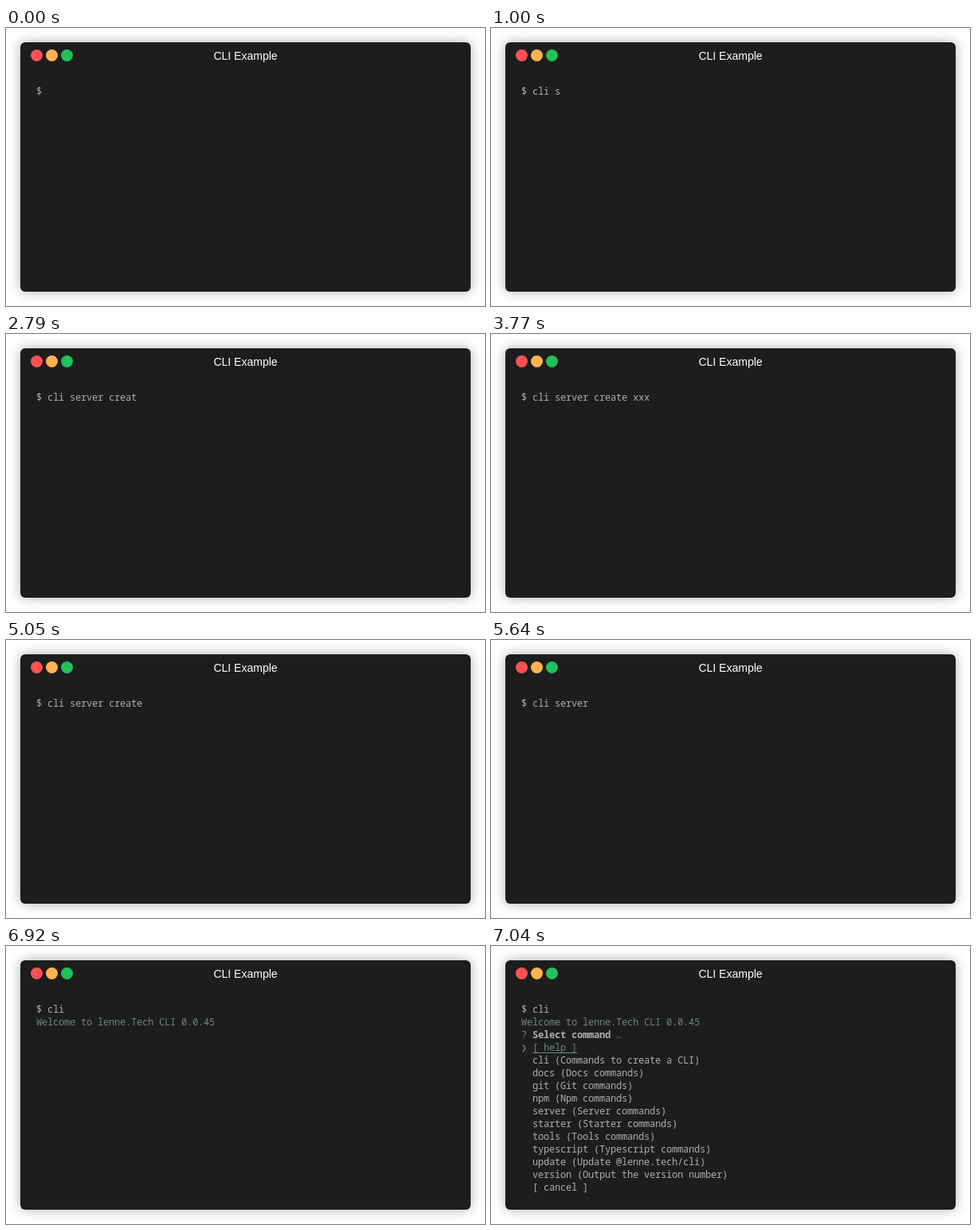
Write an HTML page with a canvas that moves like this. It is 601 by 350 pixels and loops after 8000 ms.

```html
<!DOCTYPE html>
<html lang="en">
<head>
<meta charset="utf-8">
<title>CLI Example</title>
<style>
  html, body { margin: 0; width: 100%; height: 100%; overflow: hidden; background: #fff; }
  .window {
    position: absolute; left: 18px; top: 18px; width: 565px; height: 314px;
    border-radius: 6px; background: #1d1d1d; box-shadow: 0 0 15px rgba(0, 0, 0, .32);
  }
  canvas { position: absolute; left: 0; top: 0; }
</style>
</head>
<body>
<div class="window"></div>
<canvas id="stage" width="601" height="350"></canvas>
<script>
const ctx = document.getElementById('stage').getContext('2d');

const LOOP = 8000;
const CELL = 7, ROW = 16, LEFT = 38, BASELINE = 84;
const MONO = '12px "Noto Sans Mono", "DejaVu Sans Mono", monospace';
const FG = '#afafaf', CYAN = '#708387', GRAY = '#626566';

const COMMAND = 'cli server create xxx';
const WELCOME_AT = 6920, MENU_AT = 7040;

// Moments at which the visible part of the command reaches a given length.
const keys = [];
const type = (from, ...times) => times.forEach((t, i) => keys.push([t, from + i]));
const erase = (from, ...times) => times.forEach((t, i) => keys.push([t, from - i]));
const evenly = (start, end, n) =>
  Array.from({ length: n }, (_, i) => start + (end - start) * i / (n - 1));

type(1, 200, 400, 600, 800);
type(5, 1000, 1180, 1280, 1480, 1680, 1750, 1950);
type(12, 2110, 2310, 2450, 2650, 2790, 2970, 3170);
type(19, 3370, 3570, 3770);
erase(20, 4770, 4970, 5050);
erase(16, ...evenly(5220, 5640, 6));
erase(9, ...evenly(5800, 6120, 5), 6320);

const MENU = [
  'cli (Commands to create a CLI)',
  'docs (Docs commands)',
  'git (Git commands)',
  'npm (Npm commands)',
  'server (Server commands)',
  'starter (Starter commands)',
  'tools (Tools commands)',
  'typescript (Typescript commands)',
  'update (Update @lenne.tech/cli)',
  'version (Output the version number)',
  '[ cancel ]'
];

function print(text, col, row, color = FG, bold = false) {
  ctx.font = (bold ? 'bold ' : '') + MONO;
  ctx.fillStyle = color;
  [...text].forEach((ch, i) =>
    ctx.fillText(ch, LEFT + (col + i) * CELL, BASELINE + row * ROW));
}

function drawHeader() {
  ['#ff5154', '#ffb350', '#20c25a'].forEach((color, i) => {
    ctx.fillStyle = color;
    ctx.beginPath();
    ctx.arc(38.5 + 19 * i, 34.5, 7.5, 0, Math.PI * 2);
    ctx.fill();
  });
  ctx.font = '14px "Liberation Sans", Arial, sans-serif';
  ctx.fillStyle = '#fff';
  ctx.textAlign = 'center';
  ctx.fillText('CLI Example', 300.5, 40);
  ctx.textAlign = 'left';
}

function drawMenu() {
  print('?', 0, 2, CYAN);
  print('Select command', 2, 2, FG, true);
  print('…', 17, 2, GRAY);
  print('❯', 0, 3, CYAN);
  print('[ help ]', 2, 3, CYAN);
  ctx.fillRect(LEFT + 2 * CELL, BASELINE + 3 * ROW + 2, 8 * CELL, 1);
  MENU.forEach((item, i) => print(item, 2, 4 + i));
}

function draw(t) {
  ctx.clearRect(0, 0, 601, 350);
  drawHeader();
  let length = 0;
  for (const [time, value] of keys) if (t >= time) length = value;
  print('$ ' + COMMAND.slice(0, length), 0, 0);
  if (t >= WELCOME_AT) print('Welcome to lenne.Tech CLI 0.0.45', 0, 1, CYAN);
  if (t >= MENU_AT) drawMenu();
}

const start = performance.now();
function frame() {
  draw((performance.now() - start) % LOOP);
  requestAnimationFrame(frame);
}
frame();
</script>
</body>
</html>
```
